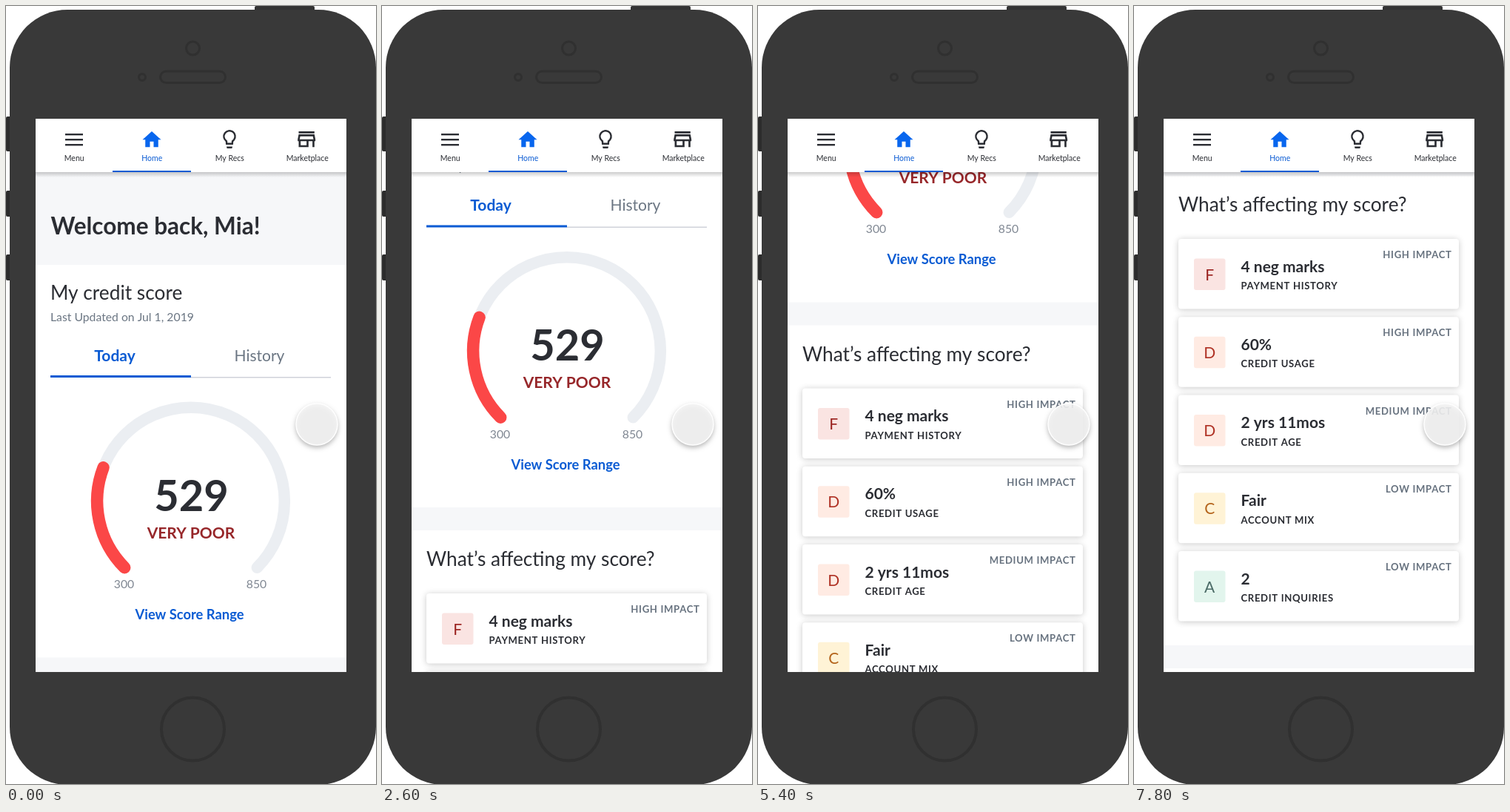
Recreate the animation shown at these times as an HTML page with a canvas. Size 500 px wide and 1049 px high, loop 8 s.

```html
<!DOCTYPE html>
<html lang="en">
<head>
<meta charset="utf-8">
<title>Credit score scroll</title>
<style>
html, body { margin: 0; width: 100%; height: 100%; overflow: hidden; background: #fff; }
canvas { display: block; }
</style>
</head>
<body>
<canvas id="stage" width="500" height="1049"></canvas>
<script>
const ctx = document.getElementById('stage').getContext('2d');
const LOOP = 8000, STEP = 200;
const INK = '#2b2d33', BLUE = '#0a5bd3', PALE = '#f6f7f9', DETAIL = '#303030';

// Scroll offset over time: [ms, px]
const SCROLL = [[300, 0], [1600, 97.5], [2600, 202.5], [4000, 337], [5400, 479], [6200, 576.5], [7150, 680.5]];

const CARDS = [
  ['F', '4 neg marks', 'PAYMENT HISTORY', 'HIGH IMPACT', '#9b2320', '#fae4e2'],
  ['D', '60%', 'CREDIT USAGE', 'HIGH IMPACT', '#b03326', '#ffebe3'],
  ['D', '2 yrs 11mos', 'CREDIT AGE', 'MEDIUM IMPACT', '#b03326', '#ffebe3'],
  ['C', 'Fair', 'ACCOUNT MIX', 'LOW IMPACT', '#b5651d', '#fff3d6'],
  ['A', '2', 'CREDIT INQUIRIES', 'LOW IMPACT', '#4a6a66', '#e2f5ed']
];

const secant = i => (SCROLL[i + 1][1] - SCROLL[i][1]) / (SCROLL[i + 1][0] - SCROLL[i][0]);
const slopes = SCROLL.map((p, i) => {
  if (i === 0 || i === SCROLL.length - 1) return 0;
  const a = secant(i - 1), b = secant(i);
  return 2 * a * b / (a + b);
});

// Monotone cubic interpolation through the scroll points
function scrollAt(t) {
  const last = SCROLL.length - 1;
  if (t <= SCROLL[0][0]) return SCROLL[0][1];
  if (t >= SCROLL[last][0]) return SCROLL[last][1];
  const i = SCROLL.findIndex(p => p[0] > t) - 1;
  const [t0, y0] = SCROLL[i], [t1, y1] = SCROLL[i + 1];
  const h = t1 - t0, u = (t - t0) / h, v = 1 - u;
  return y0 * (1 + 2 * u) * v * v + h * slopes[i] * u * v * v
    + y1 * u * u * (3 - 2 * u) - h * slopes[i + 1] * u * u * v;
}

function rect(x, y, w, h, color, radius = 0) {
  ctx.fillStyle = color;
  ctx.beginPath();
  ctx.roundRect(x, y, w, h, radius);
  ctx.fill();
}

function text(str, x, y, size, color, { weight = 400, align = 'left', spacing = 0 } = {}) {
  ctx.font = `${weight} ${size}px Lato, sans-serif`;
  ctx.letterSpacing = spacing + 'px';
  ctx.textAlign = align;
  ctx.fillStyle = color;
  ctx.fillText(str, x, y);
}

function arc(x, y, r, from, to, width, color) {
  ctx.strokeStyle = color;
  ctx.lineWidth = width;
  ctx.lineCap = 'round';
  ctx.beginPath();
  ctx.arc(x, y, r, from * Math.PI / 180, to * Math.PI / 180);
  ctx.stroke();
}

const ring = (x, y, r, width) => arc(x, y, r, 0, 360, width, DETAIL);

function withShadow(color, blur, offsetY, draw) {
  ctx.save();
  ctx.shadowColor = color;
  ctx.shadowBlur = blur;
  ctx.shadowOffsetY = offsetY;
  draw();
  ctx.restore();
}

function icon(path, x, y, scale, color) {
  ctx.save();
  ctx.translate(x, y);
  ctx.scale(scale, scale);
  ctx.fillStyle = color;
  ctx.fill(path, 'evenodd');
  ctx.restore();
}

const HOUSE = new Path2D('M10 20v-6h4v6h5v-8h3L12 3 2 12h3v8z');
const SHOP = new Path2D('M18.4 9l.6 3H5l.6-3zM20 4H4v2h16zM20 7H4l-1 5v2h1v6h10v-6h4v6h2v-6h1v-2zM6 18v-4h6v4z');

function drawPhone() {
  rect(0, 0, 500, 1049, '#fff');
  rect(336, 0, 81, 10, '#333', 2);
  for (const [y, h] of [[149, 47], [249, 35], [335, 35]]) rect(0, y, 8, h, '#2c2c2c', 2);
  rect(5, 5, 495, 1045, '#393939', 78);
  ring(252.5, 57, 9, 3);
  ring(184, 96, 4.5, 3);
  ring(252.5, 975, 42.5, 4);
  ctx.lineWidth = 3;
  ctx.beginPath();
  ctx.roundRect(208.5, 88, 88, 15.5, 8);
  ctx.stroke();
}

function drawGauge() {
  const cx = 249.75, cy = 667.75, r = 126.6;
  arc(cx, cy, r, 135, 405, 15.5, '#ebeef2');
  arc(cx, cy, r, 135, 201, 16.5, '#fb4747');
  text('529', 250.5, 680.5, 57.75, INK, { weight: 700, align: 'center' });
  text('VERY POOR', 250, 717.5, 21, '#97272a', { weight: 700, align: 'center' });
  text('300', 159.5, 785, 15.75, '#808893', { align: 'center' });
  text('850', 338.5, 785, 15.75, '#808893', { align: 'center' });
  text('View Score Range', 248, 827, 18.375, BLUE, { weight: 700, align: 'center' });
}

function drawCard([grade, title, label, impact, color, tint], y) {
  withShadow('rgba(0,0,0,.22)', 8, 1, () => rect(60, y, 379, 94.5, '#fff', 4));
  rect(81, y + 26.5, 42.5, 42.5, tint, 3);
  text(grade, 102.2, y + 55.5, 21, color, { align: 'center' });
  text(title, 144.5, y + 44.5, 21, INK, { weight: 700 });
  text(label, 144.5, y + 68, 13.125, INK, { weight: 700, spacing: .66 });
  text(impact, 429.5, y + 26, 13.125, '#67727f', { weight: 700, align: 'right', spacing: .66 });
}

function drawPage() {
  rect(40, 152, 420, 197, PALE);
  text('Welcome back, Mia!', 60.5, 308, 31.5, INK, { weight: 700 });

  text('My credit score', 60, 396, 26.25, INK);
  text('Last Updated on Jul 1, 2019', 60, 424.5, 15.75, '#6b7683');
  text('Today', 147, 478.5, 21, BLUE, { weight: 700, align: 'center' });
  text('History', 342.5, 478.5, 21, '#6b7683', { align: 'center' });
  rect(250, 500, 189, 1.5, '#cfd2da');
  rect(60, 498, 190, 3, BLUE);
  drawGauge();

  rect(40, 878.5, 420, 31, PALE);
  text('What’s affecting my score?', 60, 957.5, 26.25, INK);
  CARDS.forEach((card, i) => drawCard(card, 994.5 + i * 105.25));
  rect(40, 1542.5, 420, 31, PALE);
}

function drawNav() {
  const shade = ctx.createLinearGradient(0, 224, 0, 231);
  shade.addColorStop(0, 'rgba(0,0,0,.2)');
  shade.addColorStop(1, 'rgba(0,0,0,0)');
  rect(40, 224, 420, 7, shade);
  rect(40, 152, 420, 72, '#fff');
  rect(144, 222, 106, 2, BLUE);

  for (const y of [172, 179, 186]) rect(80, y, 24, 2.4, INK);
  icon(HOUSE, 182, 165.2, 1.25, '#0866ee');
  icon(SHOP, 390.2, 163.7, 1.33, INK);

  // Bulb
  arc(302, 175.8, 7.6, 125, 415, 2.4, INK);
  ctx.lineCap = 'butt';
  ctx.beginPath();
  ctx.moveTo(297.9, 181.8);
  ctx.lineTo(298.2, 185.8);
  ctx.lineTo(305.8, 185.8);
  ctx.lineTo(306.1, 181.8);
  ctx.stroke();
  rect(298.2, 189.5, 7.6, 2.5, INK, [0, 0, 1.2, 1.2]);

  ['Menu', 'Home', 'My Recs', 'Marketplace'].forEach((label, i) =>
    text(label, 92.2 + i * 105, 209, 10.5, i === 1 ? BLUE : INK, { align: 'center' }));
}

function drawTouch() {
  const disc = () => {
    ctx.beginPath();
    ctx.arc(420, 564, 28.5, 0, 2 * Math.PI);
    ctx.fill();
  };
  ctx.fillStyle = 'rgba(245,245,245,.88)';
  withShadow('rgba(0,0,0,.32)', 6, 3, disc);
  arc(420, 564, 28, 0, 360, 1.5, 'rgba(255,255,255,.9)');
}

function draw(t) {
  drawPhone();
  ctx.save();
  ctx.beginPath();
  ctx.rect(40, 152, 420, 746);
  ctx.clip();
  rect(40, 152, 420, 746, '#fff');
  ctx.save();
  ctx.translate(0, -scrollAt(t));
  drawPage();
  ctx.restore();
  drawNav();
  drawTouch();
  ctx.restore();
}

const start = performance.now();
function tick() {
  const t = (performance.now() - start) % LOOP;
  draw(Math.floor(t / STEP) * STEP);
  requestAnimationFrame(tick);
}
tick();
</script>
</body>
</html>
```
